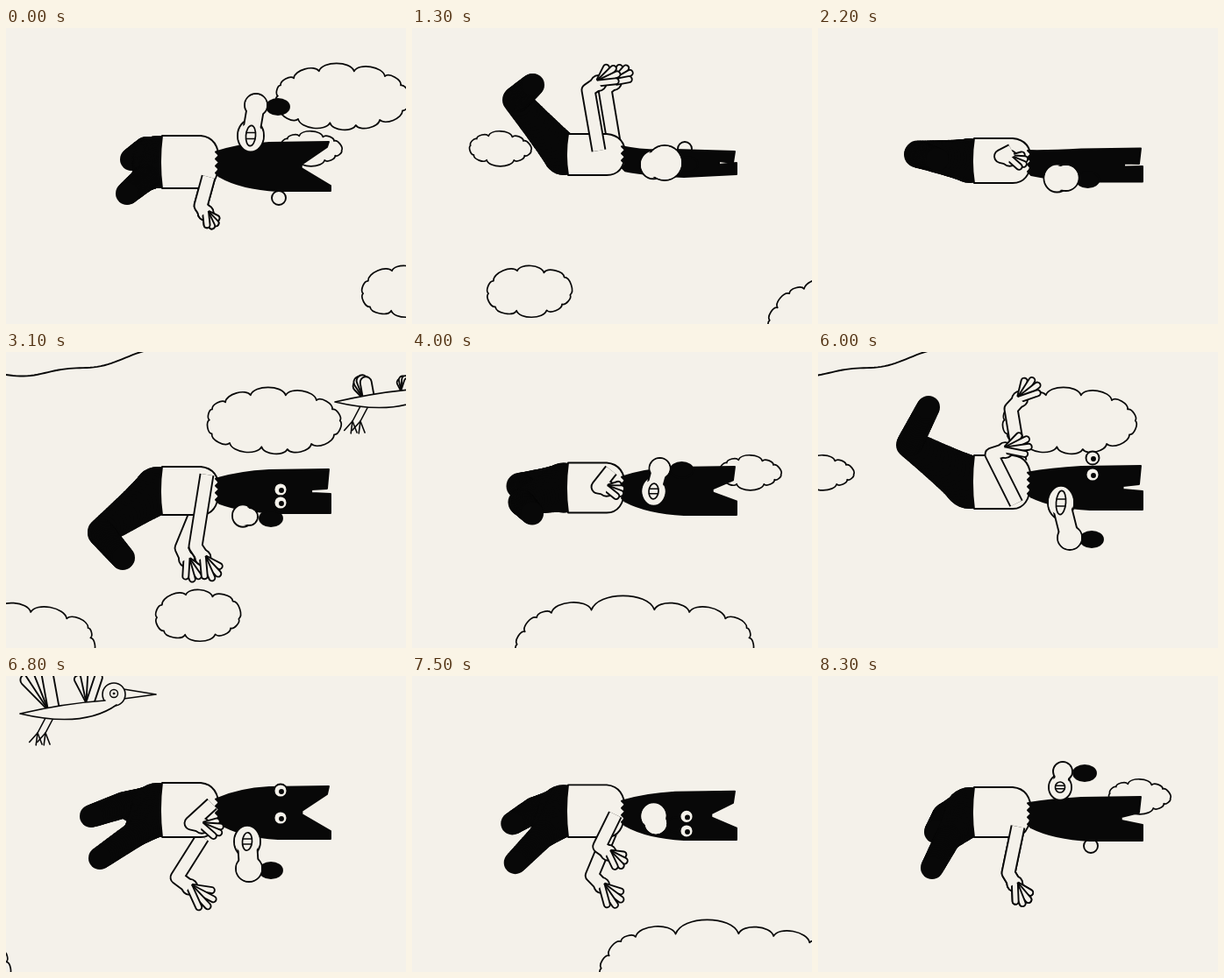
An HTML page with a canvas that plays this animation: 456x338 px, repeating every 8.4 s.

```html
<!DOCTYPE html>
<html lang="en">
<head>
<meta charset="utf-8">
<title>Falling</title>
<style>
html, body { margin: 0; width: 100%; height: 100%; overflow: hidden; background: #f4f1ea; }
canvas { display: block; width: 100vw; height: 100vh; }
</style>
</head>
<body>
<canvas id="stage" width="456" height="338"></canvas>
<script>
const ctx = document.getElementById('stage').getContext('2d');
const INK = '#080808', PAPER = '#f4f1ea', LINE = 1.9;
const STEP = 100, STEPS = 84, TAU = Math.PI * 2;

const mix = (a, b, t) => Array.isArray(a) ? a.map((v, i) => mix(v, b[i], t)) : a + (b - a) * t;
const noise = n => {
  const s = Math.sin(n * 12.9898) * 43758.5453;
  return s - Math.floor(s) - 0.5;
};
const range = (n, f) => Array.from({ length: n }, (_, i) => f(i));
const polar = ([x, y], angle, r) => [x + r * Math.cos(angle), y + r * Math.sin(angle)];

// Joints only: legs are [knee, foot], arms [root, wrist, tip],
// head [centre y, half height, half gap of the ears], eyes two heights.
const POSES = [
  { at: 0, torso: [123, 183], head: [158, 28, 22], eyes: [194, 194],
    legs: [[[160, 139], [143, 150]], [[158, 172], [138, 189]]],
    near: [[231, 170], [222, 203], [238, 226]],
    cheek: [279, 123], tip: [285, 88], tipSize: 13 },
  { at: 13, torso: [121, 168], head: [154, 13, 0], eyes: [138, 138],
    legs: [[[118, 82], [137, 65]], [[119, 82], [138, 65]]],
    near: [[213, 140], [201, 71], [234, 48]], far: [[230, 130], [220, 70], [248, 47]],
    cheek: [275, 156], tip: [288, 154], tipSize: 20 },
  { at: 31, torso: [131, 186], head: [159, 25, 3], eyes: [157, 172],
    legs: [[[108, 207], [133, 236]], [[108, 205], [134, 235]]],
    near: [[229, 140], [216, 222], [240, 258]], far: [[218, 180], [200, 224], [217, 260]],
    cheek: [270, 187], tip: [277, 188], tipSize: 10 },
  { at: 49, torso: [122, 181], head: [158, 30, 21], eyes: [165, 165],
    legs: [[[137, 99], [150, 94]], [[141, 138], [140, 134]]],
    near: [[225, 130], [208, 86], [240, 60]],
    cheek: [281, 131], tip: [288, 78], tipSize: 14 },
  { at: 60, torso: [118, 179], head: [155, 25, 4], eyes: [121, 140],
    legs: [[[104, 106], [126, 63]], [[105, 104], [125, 64]]],
    near: [[226, 173], [198, 117], [242, 103]], far: [[230, 125], [220, 65], [249, 33]],
    cheek: [277, 172], tip: [287, 212], tipSize: 14 },
  { at: 68, torso: [122, 184], head: [156, 30, 21], eyes: [131, 162],
    legs: [[[135, 147], [97, 160]], [[148, 180], [107, 208]]],
    near: [[235, 146], [211, 168], [246, 176]], far: [[224, 184], [195, 230], [236, 261]],
    cheek: [275, 189], tip: [277, 220], tipSize: 15 },
  { at: 83, torso: [127, 184], head: [163, 25, 7], eyes: [194, 194],
    legs: [[[145, 160], [134, 178]], [[148, 185], [130, 219]]],
    near: [[228, 172], [217, 225], [238, 260]],
    cheek: [276, 127], tip: [279, 109], tipSize: 11 }
];
for (const pose of POSES) pose.far = pose.far || pose.near;

function poseAt(step) {
  const i = POSES.findLastIndex(p => p.at <= step);
  const a = POSES[i], b = POSES[(i + 1) % POSES.length];
  const t = (step - a.at) / ((b.at || STEPS) - a.at);
  return Object.fromEntries(Object.keys(a).map(key => [key, mix(a[key], b[key], t)]));
}

function path(pts, closed) {
  ctx.beginPath();
  pts.forEach(p => ctx.lineTo(...p));
  if (closed) ctx.closePath();
}
function paint(fill, width = LINE) {
  if (fill) { ctx.fillStyle = fill; ctx.fill(); }
  ctx.lineWidth = width;
  ctx.strokeStyle = INK;
  ctx.stroke();
}
function oval([x, y], rx, ry = rx, fill = PAPER, turn = 0, width = LINE) {
  ctx.beginPath();
  ctx.ellipse(x, y, rx, ry, turn, 0, TAU);
  paint(fill, width);
}
function stroke(pts, width, color, cap = 'round') {
  ctx.lineCap = cap;
  ctx.lineWidth = width;
  ctx.strokeStyle = color;
  path(pts);
  ctx.stroke();
  ctx.lineCap = 'round';
}
// A hollow tube: a broad ink line with a narrower paper line inside.
function tube(pts, width, cap) {
  stroke(pts, width + LINE, INK, cap);
  stroke(pts, width - LINE, PAPER, cap);
}
function fan(root, angle, spread, count, length, width) {
  for (let i = 0; i < count; i++) {
    const k = i / (count - 1) * 2 - 1;
    tube([root, polar(root, angle + k * spread, length * (1 - 0.18 * k * k))], width);
  }
}

function drawArm([root, wrist, tip]) {
  const angle = Math.atan2(tip[1] - wrist[1], tip[0] - wrist[0]);
  const reach = Math.hypot(tip[0] - wrist[0], tip[1] - wrist[1]);
  const palm = polar(wrist, angle, reach * 0.35);
  stroke([root, wrist, palm], 15 + LINE, INK, 'butt');
  oval(palm, 9);
  fan(palm, angle, 0.5, 4, reach * 0.6, 7);
  stroke([root, wrist, palm], 15 - LINE, PAPER, 'butt');
}

function drawLeg(hip, hipSize, [knee, foot]) {
  ctx.fillStyle = INK;
  for (let i = 0; i <= 40; i++) {
    const t = i / 20;
    const [x, y] = t < 1 ? mix(hip, knee, t) : mix(knee, foot, t - 1);
    const r = t < 1 ? mix(hipSize, 15, t ** 0.8) : mix(15, 13, t - 1);
    ctx.beginPath();
    ctx.arc(x, y, r, 0, TAU);
    ctx.fill();
  }
}

function drawTorso([top, bottom]) {
  const mid = (top + bottom) / 2;
  ctx.beginPath();
  ctx.moveTo(178, top);
  ctx.lineTo(222, top);
  ctx.quadraticCurveTo(243, top + 2, 243, mid);
  ctx.quadraticCurveTo(241, bottom, 222, bottom);
  ctx.lineTo(178, bottom);
  ctx.quadraticCurveTo(174, mid, 178, top);
  paint(PAPER);
}

function drawHead([y, half, gap], neck) {
  const brow = Math.max(half, 16), notch = 365 - 15 - gap * 0.6;
  ctx.beginPath();
  for (let i = 0; i < 8; i++) ctx.lineTo(243 - i % 2 * 4, neck + 14 - i * 4);
  ctx.quadraticCurveTo(265, y - brow + 3, 300, y - brow + 1);
  ctx.lineTo(368, y - half);
  ctx.lineTo(366, y - gap);
  ctx.lineTo(notch, y - 2);
  ctx.lineTo(notch, y + 2);
  ctx.lineTo(370, y + gap);
  ctx.lineTo(370, y + half);
  ctx.lineTo(310, y + brow);
  ctx.quadraticCurveTo(268, y + brow - 2, 243, neck + 14);
  paint(INK);
}

function drawMuzzle({ cheek, tip, tipSize }) {
  const length = Math.hypot(tip[0] - cheek[0], tip[1] - cheek[1]);
  const cheekSize = Math.min(15, tipSize + 2);
  const mouth = length * 0.33;
  oval([tip[0] + 25, tip[1] + 2], 13, 9, INK);
  oval(cheek, cheekSize, cheekSize + length / 10);
  oval(tip, tipSize);
  tube([cheek, tip], Math.min(22, tipSize * 1.5));
  ctx.fillStyle = PAPER;
  for (const [p, r] of [[cheek, cheekSize], [tip, tipSize]]) {
    ctx.beginPath();
    ctx.arc(...p, r - 1, 0, TAU);
    ctx.fill();
  }
  if (mouth < 6) return;
  oval(cheek, 5.5, mouth, PAPER, 0.08, 1.7);
  for (const k of [-0.3, 0.3]) {
    const y = cheek[1] + k * mouth;
    stroke([[cheek[0] - 5, y], [cheek[0] + 5, y]], 1.5, INK);
  }
}

function drawFigure(pose) {
  const [top, bottom] = pose.torso, mid = (top + bottom) / 2;
  const facing = Math.abs(pose.eyes[1] - pose.eyes[0]) > 8;
  drawArm(pose.far);
  pose.legs.forEach(leg => drawLeg([173, mid], (bottom - top) / 2, leg));
  drawTorso(pose.torso);
  if (!facing) oval([311, pose.eyes[0]], 8);
  drawHead(pose.head, (mid + pose.head[0]) / 2);
  drawArm(pose.near);
  drawMuzzle(pose);
  if (facing) for (const y of pose.eyes) {
    oval([313, y], 7.5);
    oval([314, y + 1], 2, 2, INK);
  }
}

const CLOUDS = {
  small: { y: 137, rx: 36, ry: 15, bumps: 10 },
  wide: { y: 80, rx: 80, ry: 32, bumps: 14 },
  low: { y: 301, rx: 50, ry: 25, bumps: 10 },
  near: { y: 335, rx: 148, ry: 46, bumps: 19 }
};
function drawCloud(left, { shape }) {
  const { y, rx, ry, bumps } = CLOUDS[shape];
  const squash = v => Math.sign(v) * Math.abs(v) ** 0.85;
  const joints = range(bumps, i => {
    const a = Math.PI + (i + 0.5 * noise(i + rx)) / bumps * TAU;
    const size = 0.94 + 0.12 * noise(i * 3 + ry);
    return [left + rx + rx * size * squash(Math.cos(a)), y + ry * size * squash(Math.sin(a))];
  });
  ctx.beginPath();
  ctx.moveTo(...joints[0]);
  joints.forEach(([ax, ay], i) => {
    const [bx, by] = joints[(i + 1) % bumps], dx = bx - ax, dy = by - ay;
    ctx.bezierCurveTo(ax + dx * 0.1 + dy * 0.3, ay + dy * 0.1 - dx * 0.3,
      bx - dx * 0.1 + dy * 0.3, by - dy * 0.1 - dx * 0.3, bx, by);
  });
  paint(PAPER, 1.7);
}

function drawEdge(left) {
  path(range(90, i => {
    const x = i * 4 - 196, u = x / 160;
    return [left + x, 26 - 26 * u * Math.abs(u) + 2 * Math.sin(x / 14)];
  }));
  paint(null);
}

function drawBird(x, { y, beak, wing }) {
  ctx.save();
  ctx.translate(x, y);
  for (const hip of [38, 47]) {
    const foot = [hip - 10, 87];
    stroke([[hip, 68], foot], 1.6, INK);
    for (const a of [1.2, 1.7, 2.3]) stroke([foot, polar(foot, a, 14)], 1.6, INK);
  }
  fan([88, 52], -1.65, 0.4, 4, 36 * wing, 9);
  fan([46, 58], -2.05, 0.3, 4, 54 * wing, 13);
  path([[126, 37], [126 + beak, 43], [126, 48]], true);
  paint(PAPER, 1.6);
  oval([115, 43], 13, 13, PAPER, 0, 1.6);
  ctx.beginPath();
  ctx.moveTo(105, 50);
  ctx.quadraticCurveTo(60, 53, 8, 65);
  ctx.quadraticCurveTo(80, 82, 118, 55);
  paint(PAPER, 1.6);
  oval([115, 42], 4.5, 4.5, PAPER, 0, 1.4);
  oval([115, 42], 1, 1, INK, 0, 1);
  ctx.restore();
}

// Each pass stands at x on step `at` and moves left by v per step.
const pass = (draw, at, x, v, look) => ({ draw, at, x, v, ...look });
const cloud = (shape, v, ...spots) => spots.map(([at, x]) => pass(drawCloud, at, x, v, { shape }));
const PASSES = [
  ...cloud('small', 19, [0, 311], [42, 311]),
  ...cloud('wide', 155, [0, 303], [31, 225], [60, 206]),
  ...cloud('low', 96, [0, 403], [13, 83], [31, 168]),
  ...cloud('near', 96, ...range(7, i => [1 + 12 * i, 395])),
  pass(drawEdge, 31, 0, 96),
  pass(drawEdge, 60, -32, 96),
  pass(drawBird, 31, 367, 60, { y: -8, beak: 30, wing: 0.35 }),
  pass(drawBird, 49, 127, 60, { y: 205, beak: 31, wing: 1 }),
  pass(drawBird, 68, 8, 60, { y: -22, beak: 37, wing: 1 })
];

function draw(step) {
  ctx.fillStyle = PAPER;
  ctx.fillRect(0, 0, 456, 338);
  ctx.lineJoin = ctx.lineCap = 'round';
  for (const p of PASSES) {
    const since = (step - p.at + STEPS * 1.5) % STEPS - STEPS / 2;
    const x = p.x - p.v * since;
    if (x < 470 && x > -460) p.draw(x, p);
  }
  drawFigure(poseAt(step));
}

const start = performance.now();
function tick() {
  draw(Math.floor(Math.max(0, performance.now() - start) / STEP) % STEPS);
  requestAnimationFrame(tick);
}
tick();
</script>
</body>
</html>
```
